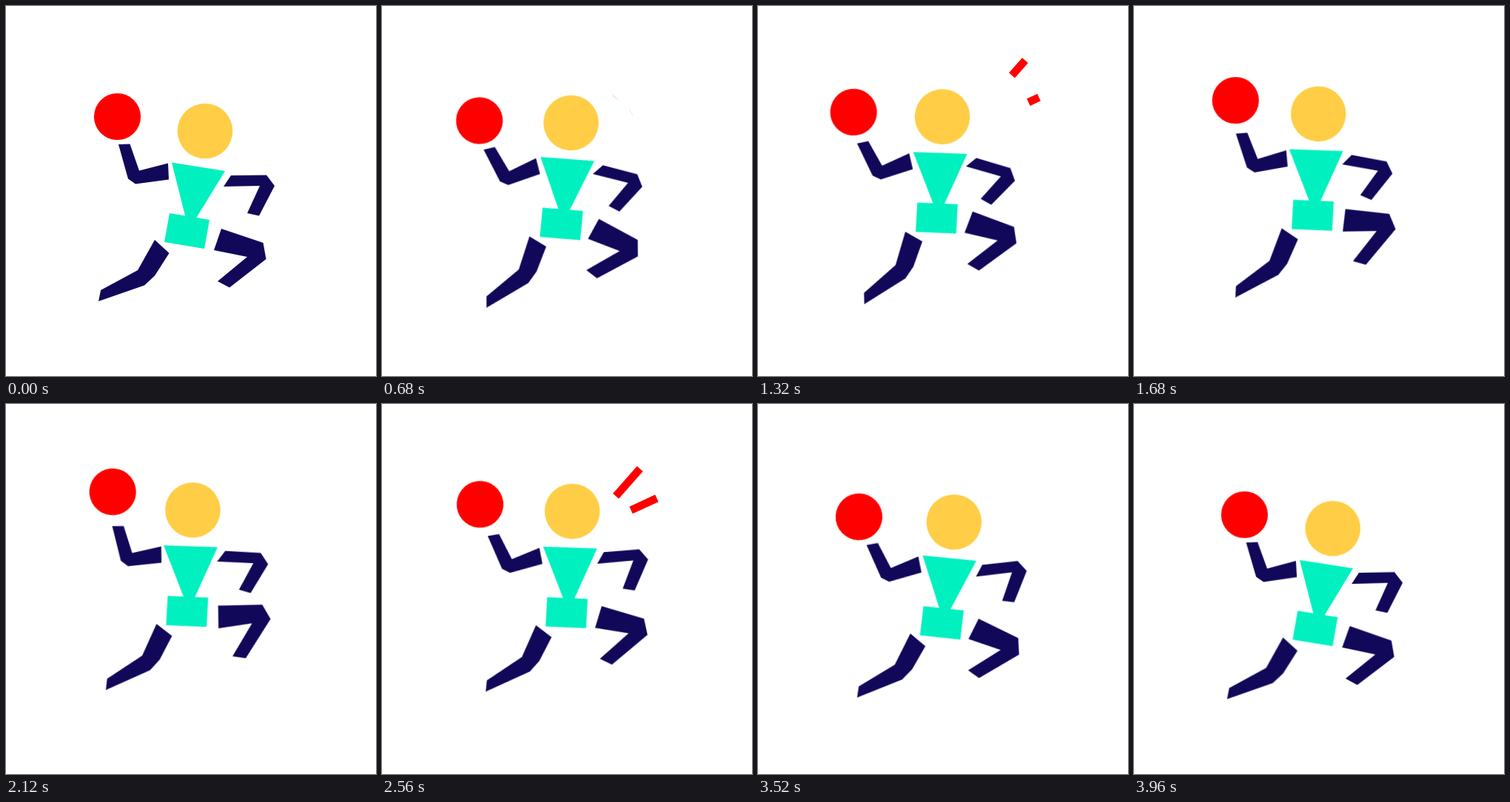
These frames come from a looping animation (500 by 500 pixels, 4 s). An HTML page:

```html
<!DOCTYPE html>
<html lang="en">
<head>
<meta charset="utf-8">
<title>Ball player</title>
<style>
  html, body { margin: 0; width: 100%; height: 100%; overflow: hidden; background: #fff; }
  svg { display: block; width: 100%; height: 100%; }

  .shift, .tilt, .limb, .ball, .spark { animation: 4s linear infinite; }

  .shift { animation-name: shift; }
  .tilt { animation-name: tilt; transform-origin: 244.5px 304px; }
  .skin { fill: #ffcd46; }
  .kit { fill: #00f0c0; }

  .limb { animation-name: swing; fill: #12085a; }
  .front-arm { --a: -9.9deg; --b: 11.4deg; --c: -10.4deg; transform-origin: 219.5px 223px; }
  .back-arm { --a: 29.6deg; --b: 13.1deg; --c: -4.7deg; transform-origin: 303.5px 238px; }
  .front-leg { --a: 21.4deg; --b: -17.6deg; --c: 22.7deg; transform-origin: 291px 319px; }
  .back-leg { --a: -9.7deg; --b: 2.2deg; --c: 1.4deg; transform-origin: 210.5px 325px; }

  .ball { animation-name: ball; fill: #f00; transform-origin: 219.5px 223px; }

  .spark {
    animation-name: spark;
    fill: none;
    stroke: #f00;
    stroke-width: 10.6;
    stroke-dasharray: var(--len) 200px;
    stroke-dashoffset: var(--len);
  }
  .long { --len: 68px; }
  .short { --len: 53px; }

  @keyframes shift {
    0%, 100% { transform: translate(0, 0); }
    25% { transform: translate(-3px, -14px); }
    42% { transform: translate(-3px, -21.2px); }
    50% { transform: translate(-1px, -24.2px); }
    64% { transform: translate(5px, -22px); }
    75% { transform: translate(8.3px, -17.2px); }
  }
  @keyframes tilt {
    0%, 100% { transform: rotate(0deg); }
    25%, 75% { transform: rotate(-7.1deg); }
  }
  @keyframes swing {
    0%, 100% { transform: rotate(0deg); }
    25% { transform: rotate(var(--a)); }
    50% { transform: rotate(var(--b)); }
    75% { transform: rotate(var(--c)); }
  }
  @keyframes ball {
    0%, 100% { transform: rotate(0deg) translate(0, 0); }
    25% { transform: rotate(-6.4deg) translate(1px, 1.1px); }
    50% { transform: rotate(15.6deg) translate(-4.1px, -4.4px); }
    75% { transform: rotate(-11.6deg) translate(-4.8px, -5.1px); }
  }
  /* Each spark draws outward, then is trimmed from its inner end. */
  @keyframes spark {
    0%, 17% { stroke-dashoffset: var(--len); }
    26.7%, 27% { stroke-dashoffset: 0px; }
    37% { stroke-dashoffset: calc(-1 * var(--len)); }
    37.01%, 57% { stroke-dashoffset: var(--len); }
    66.7%, 67% { stroke-dashoffset: 0px; }
    77% { stroke-dashoffset: calc(-1 * var(--len)); }
    77.01%, 100% { stroke-dashoffset: var(--len); }
  }
</style>
</head>
<body>
<svg viewBox="0 0 500 500">
  <path class="spark long" d="M316 124.5 L361 73.5"/>
  <path class="spark short" d="M336.5 143.5 L379.7 123.5"/>
  <g class="shift">
    <g class="tilt">
      <circle class="skin" cx="269" cy="169" r="37.3"/>
      <path class="kit" d="M224 211.5 L296 223 L247 303 Z"/>
      <path class="kit" d="M221 280 L275 289 L268 328 L214 319 Z"/>
      <path class="limb back-arm" d="M304 229 L352 228.5 L363 243 L342 283.5 L326 280 L343 243 L294 244 Z"/>
      <path class="limb front-leg" d="M291 301 L347.5 320 L351.5 342 L302 380.5 L286 372 L326 339 L281 330 Z"/>
      <path class="limb back-leg" d="M201 316 L220.5 334 L201 364.5 L187 377.5 L125 399 L128 384 L178 357 Z"/>
      <path class="limb front-arm" d="M152 187 L167.5 186.5 L180 222.5 L219 212.5 L220 234.5 L175 240.5 L165 233.5 Z"/>
      <circle class="ball" cx="150.5" cy="149.5" r="31.6"/>
    </g>
  </g>
</svg>
</body>
</html>
```
